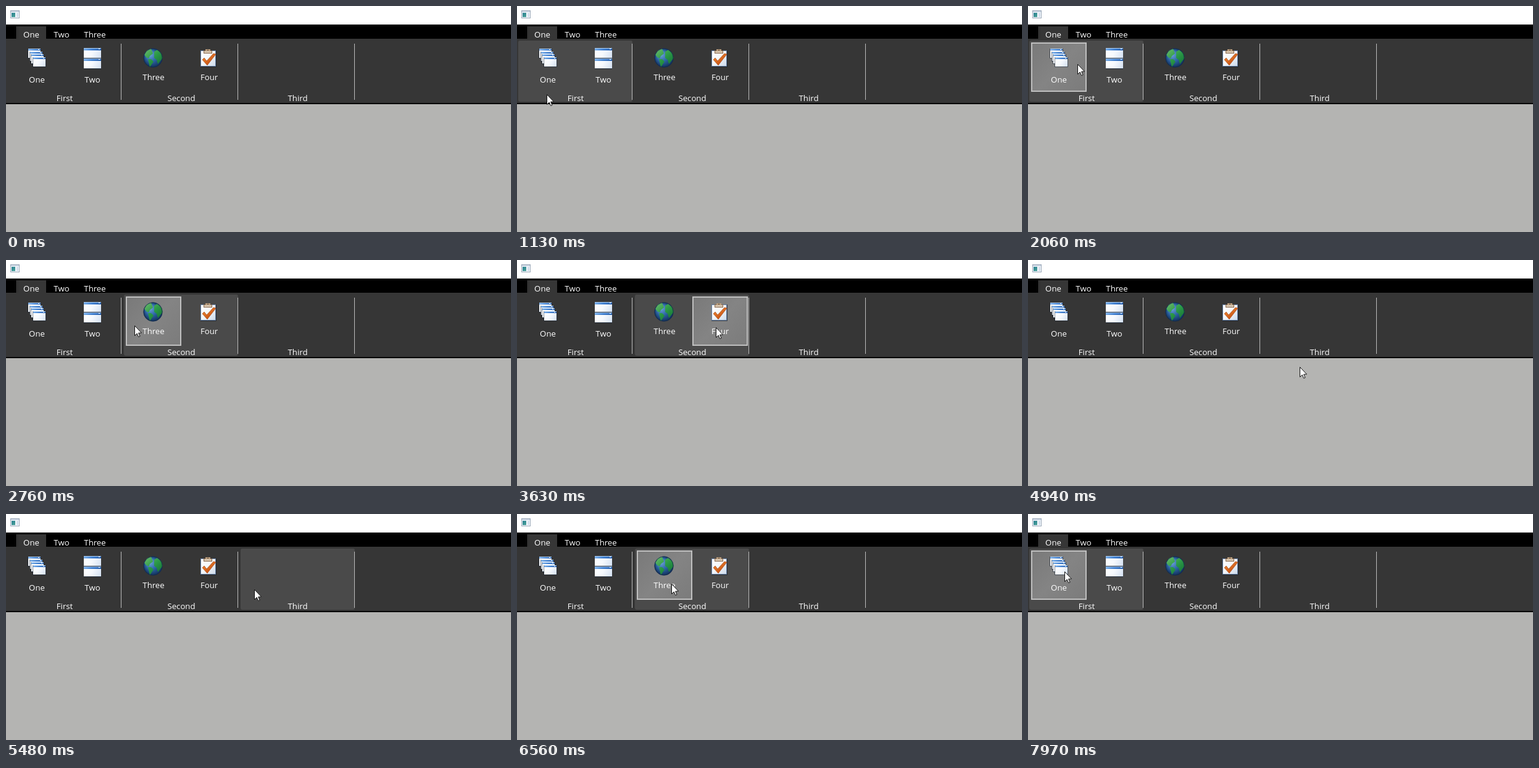
Recreate the animation shown at these times as an HTML page with a canvas. Size 818 by 366 pixels, loop 8000 ms.

```html
<!DOCTYPE html>
<html lang="en">
<head>
<meta charset="utf-8">
<title>Ribbon</title>
<style>
html, body { margin: 0; width: 100%; height: 100%; overflow: hidden; background: #b4b4b2; }
canvas { display: block; }
</style>
</head>
<body>
<canvas id="stage" width="818" height="366"></canvas>
<script>
const ctx = document.getElementById('stage').getContext('2d');
const LOOP = 8000;
const STEP = 78;

// Pointer moves: start, end, then [step, x, y] key positions.
const moves = [
  [430, 1210, [0, 413, 328], [6, 140, 184], [9, 48, 143], [10, 44, 115]],
  [1280, 1360, [0, 44, 99], [1, 44, 92]],
  [1520, 1520, [0, 44, 91]],
  [1760, 1760, [0, 51, 91]],
  [1980, 2300, [0, 62, 92], [4, 134, 100]],
  [2680, 2920, [0, 172, 103], [1, 208, 106], [3, 236, 110]],
  [3080, 3230, [0, 252, 110], [2, 314, 108]],
  [3630, 4400, [0, 322, 109], [3, 372, 118], [7, 439, 176], [8, 444, 185], [10, 441, 178]],
  [4940, 5720, [0, 440, 173], [7, 402, 122], [10, 345, 131]],
  [5800, 5800, [0, 344, 131]],
  [6420, 6560, [0, 312, 125], [2, 250, 113]],
  [7040, 7590, [0, 236, 108], [6, 58, 102], [7, 47, 102]],
  [7970, 7970, [0, 59, 93]]
];

const groups = [['First', 2, 95], ['Second', 191, 284], ['Third', 380, 472.5]];
const buttons = [
  ['One', 5, 124, cascadeIcon], ['Two', 95, 124, stackIcon],
  ['Three', 194, 120, globeIcon], ['Four', 284, 120, clipboardIcon]
];

function pointerAt(t) {
  const move = moves.findLast(m => t >= m[0]);
  if (!move) return null;
  const [start, end, ...keys] = move;
  const last = Math.round((end - start) / STEP);
  let step = 0;
  // Steps land on whole hundredths of a second.
  while (step < last && t >= Math.floor((start + (end - start) * (step + 1) / last) / 10) * 10) step++;
  const i = keys.findLastIndex(k => k[0] <= step);
  const a = keys[i], b = keys[i + 1] || a;
  const f = b === a ? 0 : (step - a[0]) / (b[0] - a[0]);
  return { x: Math.round(a[1] + (b[1] - a[1]) * f), y: Math.round(a[2] + (b[2] - a[2]) * f) };
}

function rect(x, y, w, h, fill) {
  ctx.fillStyle = fill;
  ctx.fillRect(x, y, w, h);
}

function shape(points, fill, stroke, width = 1) {
  ctx.beginPath();
  points.forEach(p => ctx.lineTo(p[0], p[1]));
  ctx.closePath();
  ctx.fillStyle = fill;
  ctx.fill();
  if (stroke) { ctx.strokeStyle = stroke; ctx.lineWidth = width; ctx.stroke(); }
}

function gradient(x0, y0, x1, y1, ...colors) {
  const g = ctx.createLinearGradient(x0, y0, x1, y1);
  colors.forEach((c, i) => g.addColorStop(i / (colors.length - 1), c));
  return g;
}

function label(text, x, y) {
  ctx.fillStyle = '#fff';
  ctx.fillText(text, x, y);
}

function pane(x, y, w, h, bar) {
  rect(x, y, w, h, gradient(x, y, x + w, y + h, '#ffffff', '#f6f9fd', '#d3e0f2'));
  rect(x, y, w, bar, gradient(x, y, x + w, y, '#79aee8', '#3f7fd0', '#2c62ad'));
  rect(x, y, w, 1, '#a9cbf0');
  rect(x + w - 4, y + 1, 2, 1, '#e8f2ff');
}

function cascadeIcon() {
  for (let i = 0; i < 4; i++) {
    const x = 36 + Math.round(i * 2.7), y = 69 + Math.round(i * 4.7);
    rect(x - 1, y, 22, 16, 'rgba(30,40,55,.55)');
    pane(x, y, 20, 15, 3);
  }
}

function stackIcon() {
  for (const y of [68, 85]) {
    rect(126, y + 1, 28, 16, '#26303d');
    pane(126, y, 28, 16, 4);
  }
}

function globeIcon() {
  ctx.save();
  ctx.beginPath();
  ctx.arc(238, 84, 15.5, 0, Math.PI * 2);
  ctx.clip();
  const sea = ctx.createRadialGradient(232, 77, 2, 238, 84, 16);
  sea.addColorStop(0, '#6fa5d8');
  sea.addColorStop(.5, '#2d66a5');
  sea.addColorStop(1, '#102c56');
  rect(222, 68, 32, 32, sea);
  const land = gradient(226, 70, 248, 98, '#69b96a', '#2c9a48', '#157235');
  shape([[224, 79], [228, 72], [235, 69], [238, 77], [233, 81], [231, 85], [227, 83]], land);
  shape([[230, 86], [235, 86], [239, 90], [233, 99]], land);
  shape([[240, 74], [245, 71], [251, 76], [254, 84], [246, 94], [244, 87], [240, 84]], land);
  ctx.restore();
  ctx.beginPath();
  ctx.arc(238, 84, 15, 0, Math.PI * 2);
  ctx.strokeStyle = 'rgba(20,40,65,.65)';
  ctx.lineWidth = 1;
  ctx.stroke();
}

function clipboardIcon() {
  rect(315, 72, 26, 27, 'rgba(20,25,35,.6)');
  rect(315, 72, 25, 26, '#647fa4');
  rect(316, 73, 23, 24, gradient(316, 73, 338, 97, '#ffffff', '#f4f7fb', '#cedbea'));
  rect(320, 72, 14, 5, '#8b6b50');
  rect(321, 73, 12, 3, '#d6c4ae');
  rect(323, 70, 8, 3, '#b69a7b');
  rect(326, 71, 2, 1, '#54402f');
  shape([[318, 87], [321, 84], [325, 89], [336, 77], [340, 78], [326, 96]],
    gradient(319, 80, 330, 96, '#f08b32', '#c34d12'), '#a8491a', .7);
}

function titleIcon() {
  rect(7, 7, 15, 13, '#9ba8b8');
  rect(8, 8, 13, 11, '#f5f8fc');
  rect(8, 8, 13, 2, '#c8d3e1');
  rect(9, 11, 6, 7, gradient(9, 11, 15, 18, '#2a7f91', '#4ca49a'));
  rect(17, 11, 3, 7, '#d4dfec');
}

function inside(p, x, y, w, h) {
  return p && p.x >= x && p.x < x + w && p.y >= y && p.y < y + h;
}

function cursor({ x, y }) {
  const points = [[.5, .5], [.5, 16.5], [4.2, 13], [6.7, 18.5], [9, 17.5], [6.6, 12.2], [11.5, 12]];
  shape(points.map(p => [x + p[0], y + p[1]]), '#fff', '#111');
}

function draw(t) {
  const p = pointerAt(t);
  rect(0, 0, 818, 366, '#b4b4b2');
  rect(0, 0, 818, 30, '#fff');
  titleIcon();
  rect(0, 30, 818, 129, '#000');
  rect(0, 53, 818, 104, '#363636');
  rect(17, 33, 48, 20, '#363636');
  rect(17, 33, 1, 20, '#555');
  rect(18, 33, 1, 20, '#202020');

  for (const [, x] of groups) {
    if (inside(p, x, 56, 185, 99)) {
      ctx.beginPath();
      ctx.roundRect(x, 56, 185, 99, 3);
      ctx.fillStyle = '#4a4a4a';
      ctx.fill();
    }
    rect(x + 184, 61, 1, 91, '#bdbdbd');
  }

  ctx.font = '13.2px "Open Sans", "Noto Sans", sans-serif';
  ctx.textAlign = 'center';
  label('One', 41, 51);
  label('Two', 90, 51);
  label('Three', 144, 51);

  for (const [name, x, baseline, icon] of buttons) {
    if (inside(p, x, 59, 90, 80)) {
      rect(x, 59, 90, 80, '#c0c0c0');
      rect(x + 2, 61, 86, 76, gradient(x, 59, x + 90, 139, '#797979', '#848484', '#7b7b7b'));
    }
    icon();
    label(name, x + 45, baseline);
  }
  for (const [name, , center] of groups) label(name, center, 154);
  if (p) cursor(p);
}

const started = performance.now();
function tick() {
  draw((performance.now() - started) % LOOP);
  requestAnimationFrame(tick);
}
tick();
</script>
</body>
</html>
```
